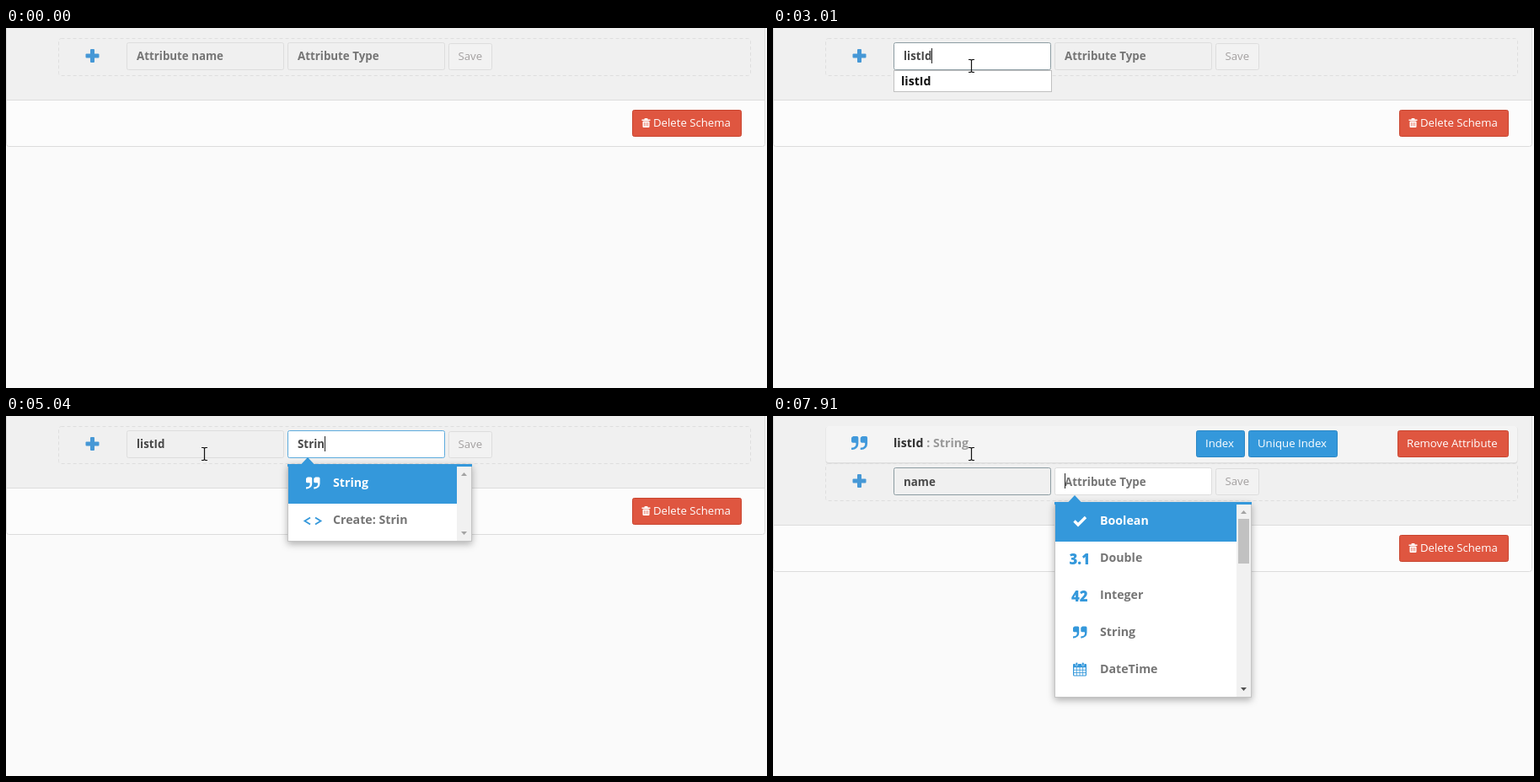
An HTML page for the animation above (7.99 s loop, 903 by 427 pixels).

```html
<!DOCTYPE html>
<html lang="en">
<head>
<meta charset="utf-8">
<title>Schema editor</title>
<style>
  html, body { margin: 0; width: 100%; height: 100%; overflow: hidden; background: #fafafa; }
  svg { display: block; width: 903px; height: 427px; }
  text { font-family: "Open Sans", "Noto Sans", sans-serif; white-space: pre; }
  .field { font-size: 13.33px; font-weight: 700; }
  .button { font-size: 13.2px; }
  .item { font-size: 14.2px; font-weight: 700; }
  .digits { font-size: 16.8px; font-weight: 800; }
  .menu { filter: drop-shadow(0 3px 4px rgba(0, 0, 0, .3)); }
</style>
</head>
<body>
<svg id="stage" viewBox="0 0 903 427"></svg>
<script>
const LOOP = 7990;
const BLUE = '#3498db', RED = '#df5640', GREY = '#757575', LINE = '#dddddd', PANEL = '#f0f0f0';
const NAME_ON = '#8c9ca2', NAME_MID = '#b2bbbe', TYPE_ON = '#5dabdd', TYPE_MID = '#9cc5e0';

const TYPES = [['check', 'Boolean'], ['3.1', 'Double'], ['42', 'Integer'], ['quote', 'String'], ['calendar', 'DateTime']];
const S_TYPES = [['quote', 'String'], ['code', 'JSONObject'], ['code', 'JSONArray'], ['code', 'Resource'], ['code', 'Create: S']];
const matches = typed => [['quote', 'String'], ['code', 'Create: ' + typed]];
const fullMenu = { items: TYPES, pick: 0, width: 234, height: 232, thumb: 53 };
const shortMenu = (typed, width) => ({ items: matches(typed), pick: 0, width, height: 92, thumb: 0 });

// Each step changes part of the state and holds until the next one.
const START = {
  name: '', type: '', focus: '', caret: false, nameLine: LINE, typeLine: LINE,
  hints: [], menu: null, added: false, hover: false, save: false
};
const STEPS = [
  [1150, { nameLine: '#d0d0d0' }],
  [1230, { focus: 'name', caret: true, nameLine: NAME_MID }],
  [1300, { nameLine: NAME_ON }],
  [1780, { caret: false }],
  [2010, { name: 'l', caret: true, hints: ['Leads &amp; Projekte', 'listId'] }],
  [2080, { name: 'lis', hints: ['listId'] }],
  [2250, { name: 'list' }],
  [2630, { name: 'listI' }],
  [3010, { name: 'listId' }],
  [3240, { focus: 'type', hints: [], menu: fullMenu }],
  [3320, { nameLine: NAME_MID, typeLine: TYPE_MID, menu: { ...fullMenu, pick: -1 } }],
  [3400, { nameLine: LINE, typeLine: TYPE_ON }],
  [3950, { caret: false }],
  [4480, { caret: true }],
  [4560, { type: 'S', menu: { ...fullMenu, items: S_TYPES, thumb: 130 } }],
  [4720, { type: 'St', menu: shortMenu('St', 203) }],
  [4800, { type: 'Str', menu: shortMenu('Str', 203) }],
  [4950, { type: 'Stri', menu: shortMenu('Stri', 219) }],
  [5040, { type: 'Strin', menu: shortMenu('Strin', 219) }],
  [5270, { type: 'String', menu: null, save: true }],
  [5820, { name: '', type: '', focus: 'name', added: true, save: false }],
  [5980, { nameLine: NAME_MID, typeLine: TYPE_MID }],
  [6050, { nameLine: NAME_ON, typeLine: LINE }],
  [6600, { caret: false }],
  [7130, { caret: true }],
  [7450, { name: 'n', hover: true, hints: ['name', 'number'] }],
  [7530, { name: 'na', hints: ['name'] }],
  [7610, { name: 'nam' }],
  [7690, { name: 'name' }],
  [7910, { focus: 'type', hints: [], menu: fullMenu }]
];

const PATH = [[0, 534, 288], [160, 470, 226], [320, 352, 118], [480, 262, 44], [620, 238, 23], [780, 235, 45]];

const pen = document.createElement('canvas').getContext('2d');
pen.font = '700 13.33px "Open Sans", "Noto Sans", sans-serif';

const rect = (x, y, w, h, fill, extra = '') =>
  `<rect x="${x}" y="${y}" width="${w}" height="${h}" fill="${fill}" ${extra}/>`;
const box = (x, y, w, h, fill, line, r = 2, extra = '') =>
  rect(x + .5, y + .5, w - 1, h - 1, fill, `stroke="${line}" rx="${r}" ${extra}`);
const text = (x, y, cls, fill, str) => `<text x="${x}" y="${y}" class="${cls}" fill="${fill}">${str}</text>`;
const shape = (d, fill, extra = '') => `<path d="${d}" fill="${fill}" ${extra}/>`;
const place = (x, y, scale, body) => `<g transform="translate(${x} ${y}) scale(${scale})">${body}</g>`;

const MARK = 'M1.5 0h4a1.5 1.5 0 0 1 1.5 1.5v6a6 6 0 0 1-6 6h-.5a.5.5 0 0 1-.5-.5v-1.2a.5.5 0 0 1 .5-.5h.5' +
  'a3.6 3.6 0 0 0 3.6-3.6v-.5a.7.7 0 0 0-.7-.7h-2.4a1.5 1.5 0 0 1-1.5-1.5v-3a1.5 1.5 0 0 1 1.5-1.5z';
const quotes = (x, y, scale, fill) =>
  place(x, y, scale, shape(MARK, fill) + place(9, 0, 1, shape(MARK, fill)));

function plus(y) {
  return rect(94.5, y - 2.5, 16, 5, '#4698d6', 'rx="1"') + rect(100, y - 8, 5, 16, '#4698d6', 'rx="1"');
}

function trash(x, y) {
  return rect(x, y + 1.5, 10, 1.5, '#fff') + rect(x + 3, y, 4, 2.2, '#fff', 'rx=".8"') +
    rect(x + 1, y + 3.4, 8, 7.6, '#fff', 'rx="1"') +
    [3, 5, 7].map(dx => rect(x + dx - .3, y + 5, .7, 4.5, RED)).join('');
}

function calendar(x, y, fill) {
  let out = rect(x + .6, y + 3, 14.8, 13, 'none', `stroke="${fill}" stroke-width="1.2" rx="1"`) +
    rect(x, y + 2, 16, 4.2, fill, 'rx="1"');
  for (const dx of [3, 10.5]) out += rect(x + dx, y + .3, 2.6, 4, fill, 'rx="1.2" stroke="#fff" stroke-width=".6"');
  for (const dx of [4.3, 8, 11.7]) out += rect(x + dx - .4, y + 6, .8, 10, fill);
  for (const dy of [9.2, 12.5]) out += rect(x, y + dy - .4, 16, .8, fill);
  return out;
}

// Icon centred on y in the menu's icon column.
function icon(kind, y, fill) {
  const line = (d, w) => shape(d, 'none', `stroke="${fill}" stroke-width="${w}"`);
  switch (kind) {
    case 'check': return line(`M357.5 ${y + .5}l4.5 4.5 9-9`, 3.4);
    case 'quote': return quotes(356, y - 6.5, 1.03, fill);
    case 'calendar': return calendar(356, y - 8, fill);
    case 'code': return line(`M361 ${y - 2.5}l-6.5 4 6.5 4M367 ${y - 2.5}l6.5 4-6.5 4`, 1.8);
    default: return text(kind === '42' ? 354 : 351.5, y + 7.5, 'digits', fill, kind);
  }
}

function button(x, y, w, label, fill, line, inset = 11) {
  return box(x, y, w, 32, fill, line) + text(x + inset, y + 20, 'button', '#fff', label);
}

function field(key, x, y, hint, s) {
  const active = s.focus === key, value = s[key];
  let out = box(x, y, 187, 33, active ? '#fff' : PANEL, s[key + 'Line']) +
    text(x + 12, y + (s.added ? 21.5 : 21), 'field', value ? '#484848' : GREY, value || hint);
  if (active && s.caret) out += rect(Math.round(x + 12 + pen.measureText(value).width), y + 7, 1, 18, '#222');
  return out;
}

function hintList(list, y) {
  if (!list.length) return '';
  return box(143, y, 188, list.length * 24 + 2, '#fff', '#c0c0c0', 0) +
    list.map((str, i) => text(152, y + 18 + i * 24, 'item', '#111', str)).join('');
}

function menuView(m, dy) {
  const { items, pick, width, height, thumb } = m;
  const right = 334 + width, bottom = 57 + height, bar = right - 18;
  const scroll = width !== 203;
  const inner = (scroll ? bar : right - 1) - 335;
  let out = `<g class="menu">${box(334, 57, width, height, '#fff', '#c4c4c4', 0)}</g>` +
    rect(334, 57, width, 3, BLUE) + shape('M350 57.5l8-8.5 8 8.5z', BLUE);
  if (scroll) {
    out += rect(bar, 60, 17, height - 4, '#f1f1f1') +
      shape(`M${bar + 5} 71l3.5-4 3.5 4z`, '#a3a3a3') +
      shape(`M${bar + 5} ${bottom - 12}l3.5 4 3.5-4z`, thumb ? '#505050' : '#a3a3a3');
    if (thumb) out += rect(bar + 2, 77, 13, thumb, '#c1c1c1');
  }
  items.forEach(([kind, label], i) => {
    const y = 79 + i * 44, on = i === pick;
    if (on) out += rect(335, y - 19, inner, 44, BLUE);
    out += icon(kind, y, on ? '#fff' : BLUE) + text(388, y + 5, 'item', on ? '#fff' : GREY, label);
  });
  return place(0, dy, 1, out);
}

function attributeRow(hover) {
  let out = rect(62.5, 12.5, 821, 44, '#dedede', 'rx="3"') +
    rect(63, 12, 820, 43, hover ? '#f4f4f4' : '#fff', 'rx="3"') +
    quotes(93, 24, 1.19, '#4199db');
  if (!hover) return out + text(143, 36.5, 'item', GREY, 'listId');
  return out +
    text(143, 36.5, 'item', '#303030', 'listId<tspan fill="#999"> : String</tspan>') +
    button(502, 17, 58, 'Index', BLUE, '#2a86c4') +
    button(564, 17, 106, 'Unique Index', BLUE, '#2a86c4') +
    button(741, 17, 132, 'Remove Attribute', RED, '#c9452f');
}

function pointer(t) {
  if (t < 370) return '';
  const at = Math.min(780, Math.floor((t - 370) / 78) * 78);
  const i = Math.max(1, PATH.findIndex(p => p[0] >= at));
  const [t0, x0, y0] = PATH[i - 1], [t1, x1, y1] = PATH[i];
  const k = (at - t0) / (t1 - t0);
  const x = Math.round(x0 + (x1 - x0) * k), y = Math.round(y0 + (y1 - y0) * k);
  const overField = x > 143 && x < 330 && y > 17 && y < 50;
  return place(x, y, 1, overField
    ? shape('M-3 -7.5h2.5l1 1 1 -1h2.5M.5 -7v14M-3 7.5h2.5l1 -1 1 1h2.5', 'none', 'stroke="#111" stroke-width="1.2"')
    : shape('M.5 .5v16l3.7-3.5 2.5 5.8 2.4-1-2.5-5.7h5z', '#fff', 'stroke="#111"'));
}

function scene(t) {
  const s = Object.assign({}, START, ...STEPS.filter(step => step[0] <= t).map(step => step[1]));
  const dy = s.added ? 44 : 0, y = 17 + dy;
  return rect(0, 0, 903, 427, '#fafafa') +
    box(0, -10, 901, 151 + dy, '#fcfcfc', '#dcdcdc', 3) +
    rect(1, 0, 899, 85 + dy, PANEL) + rect(1, 85 + dy, 899, 1, LINE) +
    box(62, 12 + dy, 822, 45, 'none', '#dedede', 3, 'stroke-dasharray="4 3"') +
    (s.added ? attributeRow(s.hover) : '') +
    plus(33 + dy) +
    field('name', 143, y, 'Attribute name', s) +
    field('type', 334, y, 'Attribute Type', s) +
    box(525, y + 1, 52, 32, s.save ? '#f8f8f8' : '#f2f2f2', s.save ? '#cccccc' : LINE) +
    text(536.5, y + 21, 'button', s.save ? '#555' : '#a3a0a0', 'Save') +
    button(743, 97 + dy, 130, 'Delete Schema', RED, '#c9452f', 25) + trash(754.5, 107 + dy) +
    hintList(s.hints, 50 + dy) +
    (s.menu ? menuView(s.menu, s.added ? 45 : 0) : '') +
    pointer(t);
}

const stage = document.getElementById('stage');
const begin = performance.now();
let shown = '';
function draw() {
  const next = scene((performance.now() - begin) % LOOP);
  if (next !== shown) stage.innerHTML = shown = next;
  requestAnimationFrame(draw);
}
draw();
</script>
</body>
</html>
```
